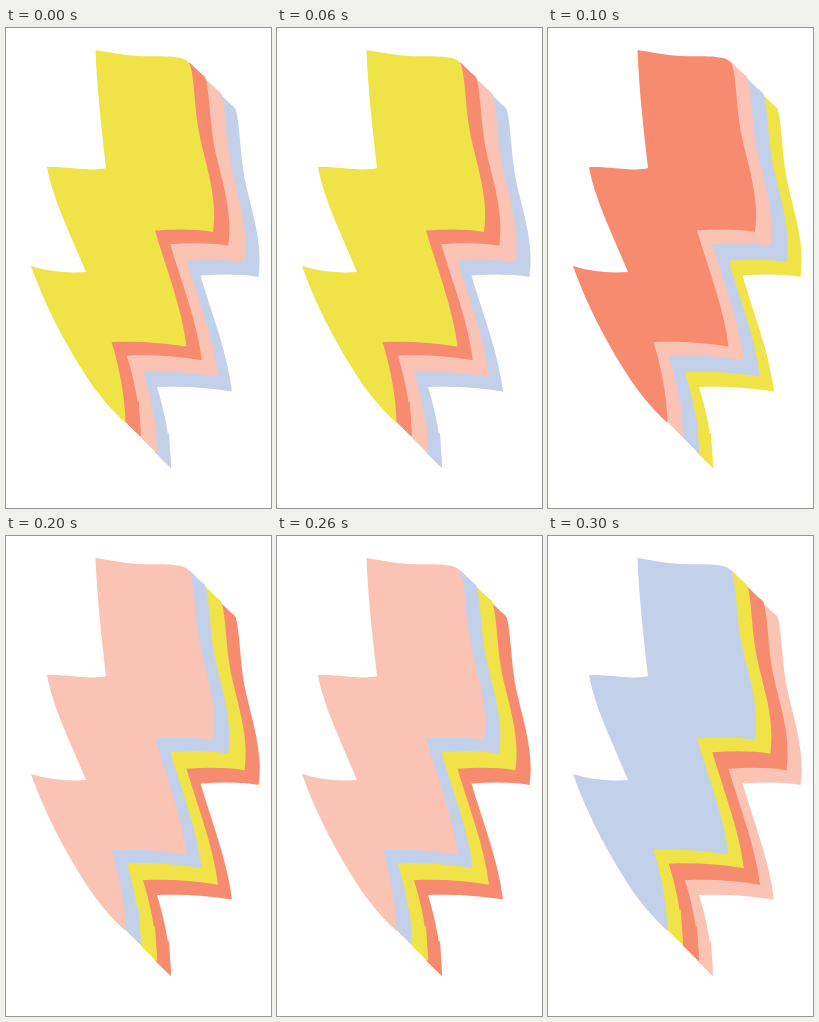
These frames come from a looping animation (265 px wide and 480 px high, 0.4 s). An HTML page:

```html
<!DOCTYPE html>
<html lang="en">
<head>
<meta charset="utf-8">
<title>Lightning bolt</title>
<style>
  html, body { margin: 0; width: 100%; height: 100%; overflow: hidden; background: #fff; }
  svg { display: block; width: 100%; height: 100%; }

  /* Each layer runs the same colour cycle, one step ahead of the layer in front. */
  use.layer { animation: cycle 400ms step-end infinite; animation-delay: calc(var(--depth) * -100ms); }

  @keyframes cycle {
    0%   { fill: #f0e348; }
    25%  { fill: #f68b70; }
    50%  { fill: #fbc3b4; }
    75%  { fill: #c3d0ea; }
    100% { fill: #f0e348; }
  }
</style>
</head>
<body>
<svg viewBox="0 0 265 480">
  <defs>
    <path id="bolt" d="
      M89.5 22 C104 24 117 27 131 28 C148 29 166 27 178 31 Q181 32 183 34.5
      C188 45 188 70 191.5 95 C195 125 213 165 207 204
      C190 201 170 201 149 202.5
      C160 240 176 280 180.5 318.5
      C155 314 130 313 105.5 314
      C112 335 119 365 119.5 395
      Q104 381 89 361 C63 324 39 278 25 238
      Q50 246 80 244
      C64 205 47 172 41 139
      C62 138 86 144 100 140
      C96 105 91 62 89.5 22 Z"/>
    <!-- The slanted ends join each rear layer to the one in front. -->
    <g id="rear">
      <use href="#bolt"/>
      <path d="M184 36 l-16 -15.5 l-14 24 l32 0 Z M119.5 395 l-16 -15.5 l14 -20 Z"/>
    </g>
  </defs>
  <use class="layer" href="#rear" x="45.5" y="45" style="--depth: 3"/>
  <use class="layer" href="#rear" x="31.5" y="30.2" style="--depth: 2"/>
  <use class="layer" href="#rear" x="15.3" y="13.7" style="--depth: 1"/>
  <use class="layer" href="#bolt" style="--depth: 0"/>
</svg>
</body>
</html>
```
